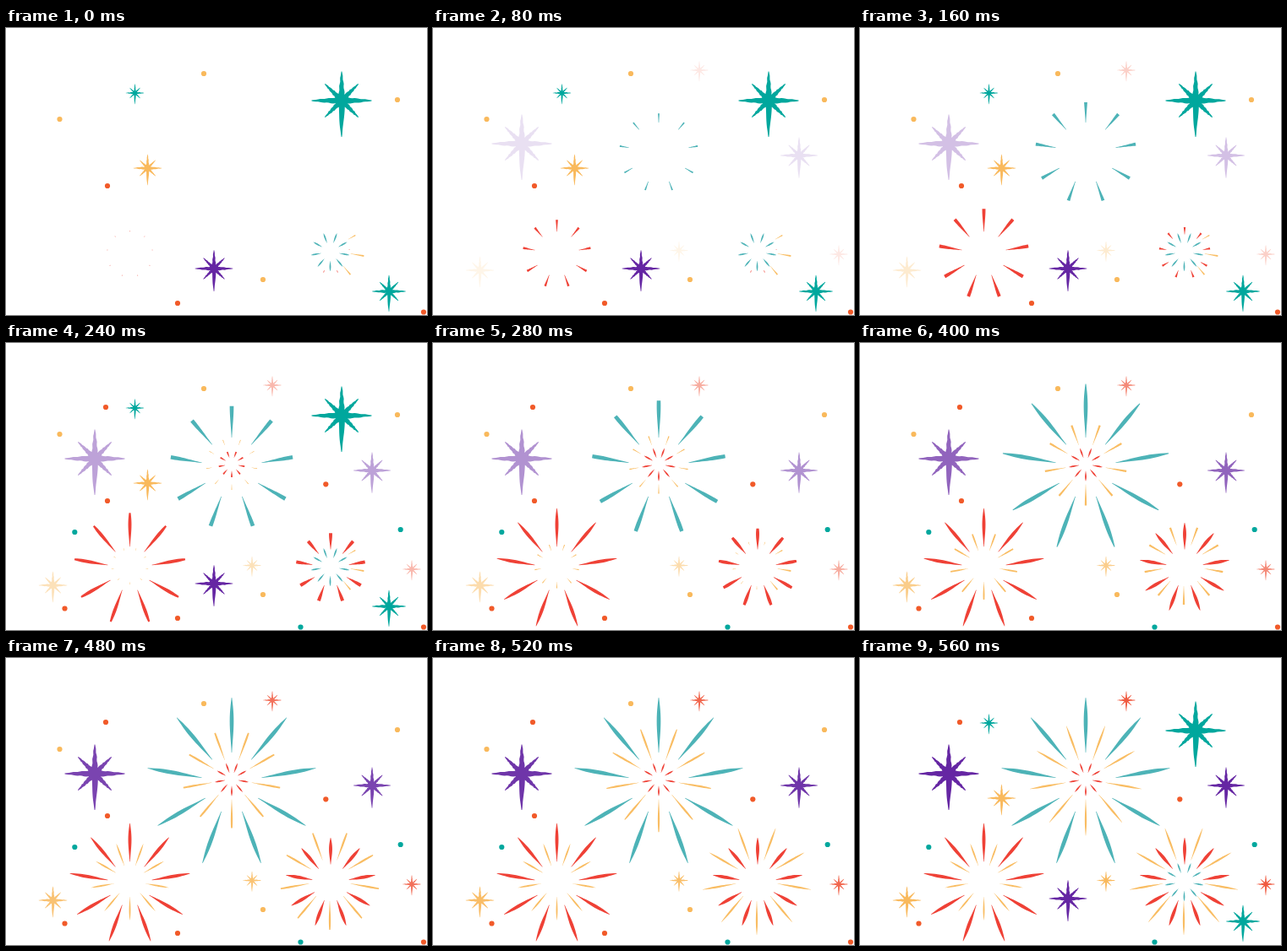
Write an HTML page that moves like this. It is 498 by 340 pixels and loops after 0.8 s.

```html
<!DOCTYPE html>
<html lang="en">
<head>
<meta charset="utf-8">
<title>Fireworks</title>
<style>
html, body { margin: 0; width: 100%; height: 100%; overflow: hidden; background: #fff; }
svg { display: block; width: 498px; height: 340px; }
</style>
</head>
<body>
<svg id="stage" viewBox="0 0 498 340" xmlns="http://www.w3.org/2000/svg"></svg>
<script>
const LOOP = 800, STEP = 40, LAST = 14;
const TEAL = '#00a79d', PURPLE = '#6526a3', YELLOW = '#f9b95c', ORANGE = '#f15a29', CORAL = '#f05a40';
const RAY_TEAL = '#4db3b7', RAY_RED = '#ef4136', RAY_YELLOW = '#f9bd63';
const svg = document.getElementById('stage');

function add(tag, attrs) {
  const el = document.createElementNS(svg.namespaceURI, tag);
  for (const name in attrs) el.setAttribute(name, attrs[name]);
  svg.appendChild(el);
  return el;
}

// Closed outline along a direction; half(r, side) gives the half width at distance r.
function blade(angle, from, to, half, steps) {
  const c = Math.cos(angle), s = Math.sin(angle), pts = [];
  const put = (r, w) => pts.push((r * c - w * s).toFixed(2) + ' ' + (r * s + w * c).toFixed(2));
  for (let i = 0; i <= steps; i++) {
    const r = from + (to - from) * i / steps;
    put(r, -half(r, -1));
  }
  for (let i = steps; i >= 0; i--) {
    const r = from + (to - from) * i / steps;
    put(r, half(r, 1));
  }
  return 'M' + pts.join('L') + 'Z';
}

// Eight-pointed star with rough edges and a longer lower arm.
function starPath() {
  let d = '';
  for (let i = 0; i < 8; i++) {
    const diagonal = i % 2 === 1;
    const len = diagonal ? 28 : i === 2 ? 43 : i === 6 ? 34.5 : 35.5;
    const base = diagonal ? 3.1 : 3.7;
    const half = (r, side) => {
      const u = r / len;
      const rough = 0.35 * Math.sin(r * 1.9 + i * 2.3 + side) * Math.min(1, (1 - u) * 4);
      return Math.max(0.2, 0.4 + base * Math.pow(1 - u, 0.8) + rough);
    };
    d += blade(i * Math.PI / 4, 0, len, half, 14);
  }
  return d;
}

const STAR = starPath();
const star = ([x, y, size, fill]) =>
  add('path', { d: STAR, fill, transform: `translate(${x} ${y}) scale(${size})` });
const dot = ([cx, cy, fill]) => add('circle', { cx, cy, r: 3.1, fill });

const blinkStars = [
  [397, 86, 1, TEAL], [152.5, 77, 0.31, TEAL], [167.5, 166, 0.47, YELLOW],
  [246, 285, 0.63, PURPLE], [453, 312, 0.56, TEAL]
].map(star);

const fadeStars = [
  [105, 137, 1, PURPLE], [433, 151, 0.62, PURPLE], [315, 50, 0.31, CORAL],
  [480, 268, 0.31, CORAL], [55.5, 287, 0.47, YELLOW], [291, 263.5, 0.31, YELLOW]
].map(star);

const earlyDots = [
  [234, 54, YELLOW], [63.5, 108, YELLOW], [463, 85, YELLOW], [304, 298, YELLOW],
  [120, 187, ORANGE], [203, 326, ORANGE], [494, 336.5, ORANGE]
].map(dot);

const lateDots = [
  [118, 76, ORANGE], [69.5, 314.5, ORANGE], [378.3, 167.3, ORANGE],
  [81.3, 224, TEAL], [466.7, 221, TEAL], [348.5, 336.5, TEAL]
].map(dot);

// Nine spindles from radius a to b, uncovered up to a growing radius.
// "least" keeps single rays uncovered to a minimum radius.
function burst(x, y, turn, a, b, width, fill, reach, least = {}) {
  const el = add('path', { fill, transform: `translate(${x} ${y})` });
  const half = r => {
    const u = Math.min(1, Math.max(0, (r - a) / (b - a)));
    return width / 2 * (0.12 + 0.88 * Math.sin(Math.PI * Math.pow(u, 1.25)));
  };
  return k => {
    let d = '';
    for (let i = 0; i < 9; i++) {
      const end = Math.min(b, Math.max(reach(k), least[i] || 0));
      if (end > a) d += blade((turn + i * 40 - 90) * Math.PI / 180, a, end, half, 14);
    }
    el.setAttribute('d', d);
  };
}

const blinkOn = k => k < 7 || k === LAST;

const bursts = [
  burst(267, 148, 0, 36, 101, 4.7, RAY_TEAL, k => 33.6 + 6.6 * k),
  burst(267, 143.5, 20, 24, 67, 2.3, RAY_YELLOW, k => 30.5 + 4.6 * (k - 6)),
  burst(267, 143.5, 20, 8, 20, 1.8, RAY_RED, k => 15.5 + 4.8 * (k - 6)),

  burst(146.5, 267.7, 0, 26.5, 72, 3.9, RAY_RED, k => 27.5 + 6.5 * k),
  burst(146.5, 264, 20, 19, 46.5, 1.9, RAY_YELLOW, k => 22 + 4.5 * (k - 6)),

  burst(383.5, 265, 20, 11, 23, 1.8, RAY_TEAL, k => blinkOn(k) ? 23 : 0),
  burst(383, 263, 20, 25, 65, 2.3, RAY_YELLOW, k => 35 + 6 * (k - 8), { 1: 35, 2: 41, 3: 38 }),
  burst(384, 266.5, 0, 22, 53.5, 3.9, RAY_RED, k => 30.5 + 5.4 * (k - 4), { 2: 23, 4: 24.5, 5: 24.5 })
];

const show = (list, on) => list.forEach(el => el.setAttribute('opacity', +on));

function draw(time) {
  const k = Math.min(LAST, Math.floor((time % LOOP) / STEP));
  show(blinkStars, blinkOn(k));
  show(fadeStars, k / LAST);
  show(earlyDots, k < LAST);
  show(lateDots, k >= 6);
  bursts.forEach(update => update(k));
}

const start = performance.now();
function tick() {
  draw(performance.now() - start);
  requestAnimationFrame(tick);
}
draw(0);
requestAnimationFrame(tick);
</script>
</body>
</html>
```
